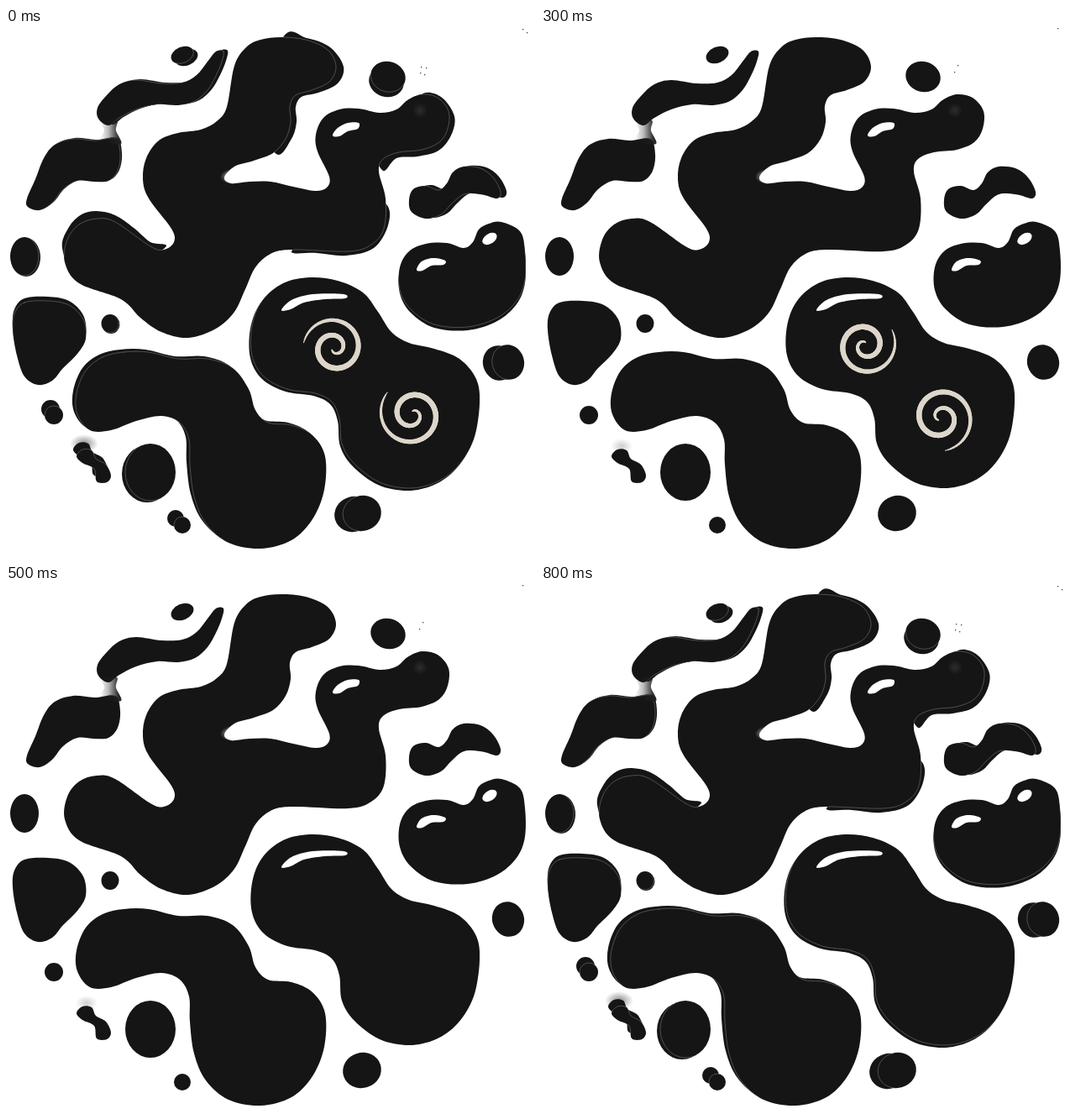
These frames come from a looping animation (630x630 px, 0.9 s). An HTML page with a canvas:

```html
<!DOCTYPE html>
<html lang="en">
<head>
<meta charset="utf-8">
<title>Ink drops</title>
<style>
  html, body { margin: 0; width: 100%; height: 100%; overflow: hidden; background: #fff; }
  canvas { display: block; width: 630px; height: 630px; }
</style>
</head>
<body>
<canvas id="stage" width="630" height="630"></canvas>
<script>
const ctx = document.getElementById('stage').getContext('2d');
const INK = '#151515', CREAM = '#ddd6ca', STEP = 100, STEPS = 9;

// Closed smooth curve through x,y pairs
function blob(...p) {
  const path = new Path2D(), n = p.length / 2;
  const at = i => { const k = (i + n) % n * 2; return [p[k], p[k + 1]]; };
  path.moveTo(p[0], p[1]);
  for (let i = 0; i < n; i++) {
    const [a, b, c, d] = [at(i - 1), at(i), at(i + 1), at(i + 2)];
    path.bezierCurveTo(b[0] + (c[0] - a[0]) / 6, b[1] + (c[1] - a[1]) / 6,
      c[0] - (d[0] - b[0]) / 6, c[1] - (d[1] - b[1]) / 6, c[0], c[1]);
  }
  path.closePath();
  return path;
}

function oval(x, y, rx, ry, tilt = 0) {
  const path = new Path2D();
  path.ellipse(x, y, rx, ry, tilt, 0, 7);
  return path;
}

const splash = blob(327,11, 357,14, 383,26, 393,46, 385,64, 364,74, 345,80, 338,93, 339,112, 333,132,
  318,149, 295,158, 272,165, 260,178, 268,185, 290,183, 315,183, 342,189, 368,194, 382,190,
  385,177, 371,147, 369,127, 378,107, 397,97, 420,96, 445,101, 465,97, 478,86, 495,79, 514,83,
  527,99, 526,120, 516,136, 495,145, 468,148, 449,156, 444,171, 452,203, 450,239, 435,258,
  408,266, 340,264, 315,269, 297,285, 285,311, 272,338, 250,358, 217,369, 185,362, 160,345,
  137,323, 87,304, 70,279, 73,252, 87,234, 108,227, 130,231, 172,260, 188,264, 200,255,
  197,239, 170,203, 163,180, 167,155, 182,134, 205,125, 232,121, 251,111, 263,94, 272,45, 286,23, 303,14);

// Extra rims of the splash in its wide pose
const rims = [
  blob(330,11, 358,12, 386,23, 402,46, 395,66, 372,77, 352,82, 345,94, 346,112, 340,132, 322,150, 300,100),
  blob(495,79, 518,82, 534,105, 530,128, 515,146, 490,153, 465,155, 449,170, 440,140, 480,110),
  blob(453,210, 455,235, 438,262, 405,271, 370,268, 340,266, 380,240, 420,200),
  blob(67,262, 75,237, 90,222, 108,218, 130,223, 152,238, 172,255, 190,261, 140,290, 85,295)
];

// Shape and its shift in the wide pose
const drops = [
  [blob(362,297, 395,301, 425,315, 443,338, 459,362, 480,375, 510,382, 540,394, 560,418, 564,448, 557,490,
    538,522, 512,541, 480,548, 445,541, 415,519, 400,495, 397,465, 388,445, 368,435, 335,430, 307,415,
    293,390, 293,355, 305,325, 330,304), -2, 3],
  [blob(140,386, 170,386, 205,394, 240,394, 270,405, 289,430, 297,455, 312,470, 340,473, 365,485, 380,510,
    379,550, 365,585, 340,610, 303,620, 265,613, 238,590, 224,558, 219,520, 218,490, 207,470, 185,462,
    155,468, 125,479, 100,479, 85,460, 84,435, 95,408, 115,392), -4, -3],
  [blob(590,231, 612,242, 618,265, 618,300, 608,325, 585,345, 550,356, 510,353, 482,335, 469,312, 469,285,
    480,266, 500,257, 525,256, 545,262, 556,255, 563,240, 575,233), 0, 4],
  [blob(485,192, 500,188, 515,193, 525,185, 532,172, 545,165, 565,167, 580,178, 589,195, 585,203, 570,199,
    555,197, 543,199, 530,210, 518,222, 500,227, 483,219, 480,205), 7, -1],
  [blob(259,28, 257,40, 250,57, 240,74, 225,87, 205,92, 180,91, 155,97, 135,107, 122,116, 110,108,
    109,95, 120,80, 135,67, 155,62, 185,66, 210,65, 227,56, 240,40, 250,28), 5, -1],
  [blob(130,132, 136,150, 133,170, 122,182, 105,183, 85,182, 68,192, 55,208, 40,217, 26,213, 25,203,
    35,180, 45,155, 58,139, 80,132, 105,134), 2, -1],
  [blob(22,327, 50,325, 75,330, 92,347, 95,370, 85,388, 68,405, 55,420, 38,425, 22,415, 13,390,
    8,360, 10,340), 0, -5],
  [blob(84,510, 91,502, 102,503, 107,513, 119,520, 125,533, 120,541, 108,540, 105,525, 91,518), -4, -8],
  [oval(172, 529, 30, 34), -4, 2],
  [oval(424, 578, 23, 21, -.3), -10, 1],
  [oval(598, 398, 19, 21, -.3), -11, 1],
  [oval(57, 461, 11, 11), -4, -7],
  [oval(210, 592, 10, 10), -8, -8],
  [oval(455, 58, 21, 18, .3), -2, 6],
  [oval(210, 32, 14, 9.5, -.4), 5, 3],
  [oval(22, 272, 17, 23), 2, 1],
  [oval(124, 352, 10.5, 11), 1, 1]
];

const shine = [
  blob(389,128, 395,119, 407,113, 420,113, 419,120, 407,123, 397,129),
  blob(489,288, 495,278, 509,274, 523,277, 521,282, 507,283, 496,289),
  blob(328,336, 340,324, 365,317, 402,317, 404,322, 380,323, 355,327, 339,335),
  oval(576, 251, 9.5, 6, -.55)
];

const calm = new Path2D(splash), wide = new Path2D();
rims.forEach(r => wide.addPath(r));
for (const [shape, dx, dy] of drops) {
  calm.addPath(shape);
  wide.addPath(shape, new DOMMatrix([1, 0, 0, 1, dx, dy]));
}

// Per step: x, y, tail angle of each spiral
const spins = [
  [391, 381, 190, 484, 460, 221],
  [390, 381, 220, 481, 461, 180],
  [389, 381, 250, 479, 461, 140],
  [386, 378, 330, 476, 464, 82],
  [390, 374, 435, 483, 469, -10]
];

function spiral(x, y, angle, dir, scale) {
  const n = 130, sweep = 670;
  const at = u => {
    const a = (angle + dir * sweep * u) * Math.PI / 180;
    const r = scale * (37 - .05 * sweep * u);
    return [x + r * Math.cos(a), y + r * Math.sin(a)];
  };
  ctx.strokeStyle = CREAM;
  ctx.lineCap = 'round';
  for (let i = 0; i < n; i++) {
    const u = i / n;
    ctx.lineWidth = 1.2 + 5.3 * Math.sin(Math.PI * Math.pow(u, .8)) ** .8;
    ctx.beginPath();
    ctx.moveTo(...at(u));
    ctx.lineTo(...at(u + 1 / n));
    ctx.stroke();
  }
}

function glow(x, y, rx, ry, rgb, alpha) {
  const g = ctx.createRadialGradient(0, 0, 0, 0, 0, 1);
  g.addColorStop(0, `rgba(${rgb},${alpha})`);
  g.addColorStop(1, `rgba(${rgb},0)`);
  ctx.save();
  ctx.translate(x, y);
  ctx.scale(rx, ry);
  ctx.fillStyle = g;
  ctx.fillRect(-1, -1, 2, 2);
  ctx.restore();
}

function bridge() {
  const g = ctx.createLinearGradient(112, 0, 134, 0);
  g.addColorStop(0, 'rgba(30,30,30,0)');
  g.addColorStop(.45, 'rgba(30,30,30,.3)');
  g.addColorStop(1, 'rgba(30,30,30,.95)');
  ctx.fillStyle = g;
  ctx.fill(blob(114,112, 132,110, 131,122, 137,138, 113,134, 117,122));
}

function specks(isWide) {
  ctx.fillStyle = '#444';
  const list = isWide
    ? [[494, 46], [500, 47], [498, 55], [493, 53], [615, 1], [620, 5]]
    : [[496, 44], [492, 52], [615, 0]];
  for (const [x, y] of list) ctx.fillRect(x, y, 1.3, 1.3);
}

function draw(step) {
  const isWide = step % 2 === 0;
  ctx.fillStyle = '#fff';
  ctx.fillRect(0, 0, 630, 630);
  if (isWide) glow(93, 495, 17, 11, '60,60,60', .6);
  else glow(96, 498, 13, 9, '90,90,90', .3);
  specks(isWide);

  ctx.fillStyle = INK;
  ctx.fill(calm);
  if (isWide) {
    ctx.fill(wide);
    ctx.save();
    ctx.clip(wide);
    ctx.strokeStyle = 'rgba(140,135,120,.5)';
    ctx.lineWidth = 1;
    ctx.stroke(calm);
    ctx.restore();
  }
  bridge();
  glow(270, 177, 15, 9, '255,255,255', .9);
  glow(493, 98, 9, 9, '90,90,90', .35);

  ctx.fillStyle = '#fff';
  shine.forEach(s => ctx.fill(s));

  const spin = spins[step];
  if (spin) {
    const [x1, y1, a1, x2, y2, a2] = spin;
    spiral(x1, y1, a1, 1, 1);
    spiral(x2, y2, a2, -1, 1.07);
  }
}

function tick() {
  draw(Math.floor(performance.now() / STEP) % STEPS);
  requestAnimationFrame(tick);
}
tick();
</script>
</body>
</html>
```
